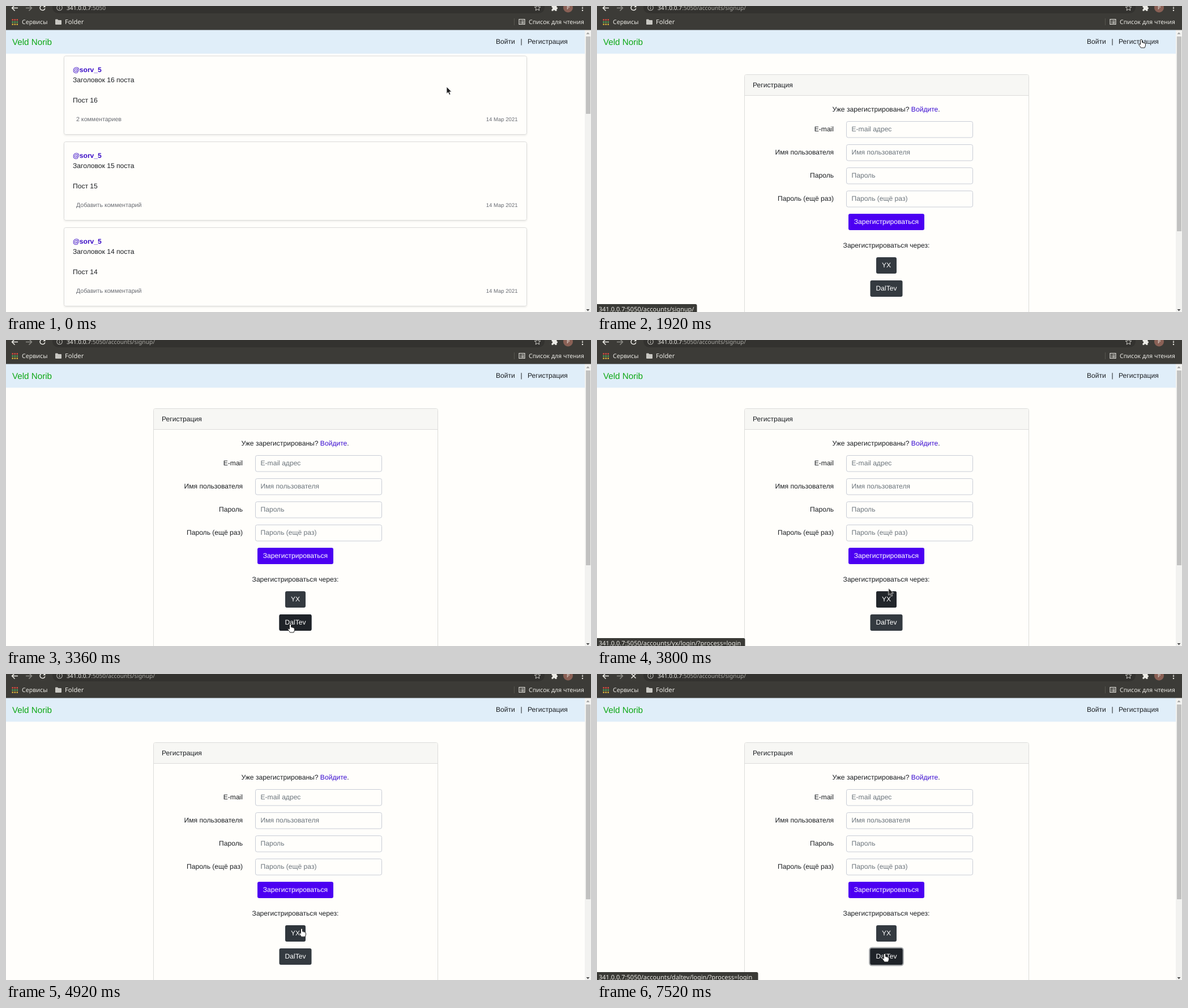
Recreate the animation shown at these times as an HTML page. Size 1033 px wide and 542 px high, loop 8 s.

```html
<!DOCTYPE html>
<html lang="ru">
<head>
<meta charset="utf-8">
<title>Регистрация</title>
<style>
html, body { margin: 0; width: 100%; height: 100%; overflow: hidden; background: #fffefb; }
svg { display: block; width: 1033px; height: 542px; }
text { font: 12.1px "Liberation Sans", Arial, sans-serif; fill: #1c1f23; text-rendering: geometricPrecision; }
.ui { font: 10.6px "Noto Sans", "Open Sans", sans-serif; fill: #ecebe6; }
.brand { font-size: 15.2px; fill: #0ea815; }
.user { font-weight: bold; fill: #3a0cc6; }
.note { font-size: 10.64px; fill: #686b72; }
.date { font-size: 9.55px; fill: #686b72; }
.link { fill: #3a0cd0; }
.hint { fill: #6c757d; }
.light { fill: #fff; }
.mid, .mid text { text-anchor: middle; }
.end, .end text { text-anchor: end; }
.line { fill: none; stroke: #ecebe6; stroke-width: 1.5; }
.card { fill: #fffefb; stroke: #dcdcda; }
.field { fill: #fffefb; stroke: #c8ccd6; }
.status text { font-size: 11px; }
.status path { fill: #3a3a36; }

.cut, .fade, #pointer { animation: 8s infinite; }
.cut { animation-timing-function: step-end; }
.fade, #pointer { animation-timing-function: linear; }

#feed { animation-name: feed; }
#signup { animation-name: signup; }
#path { animation-name: path; }
#under { animation-name: under; }
#reload { animation-name: reload; }
#stop { animation-name: stop; }
@keyframes feed { 0% { opacity: 1 } 24%, 100% { opacity: 0 } }
@keyframes signup { 0% { opacity: 0 } 24%, 100% { opacity: 1 } }
@keyframes path { 0% { opacity: 0 } 22%, 100% { opacity: 1 } }
@keyframes under { 0%, 24%, 100% { opacity: 0 } 8.4% { opacity: 1 } }
@keyframes reload { 0%, 24% { opacity: 1 } 18.5%, 69.5%, 100% { opacity: 0 } }
@keyframes stop { 0%, 24% { opacity: 0 } 18.5%, 69.5%, 100% { opacity: 1 } }

#st-join { animation-name: st-join; }
#st-first { animation-name: st-first; }
#st-second { animation-name: st-second; }
@keyframes st-join { 0%, 14% { opacity: 0 } 14.5% { opacity: .55 } 16%, 29% { opacity: 1 } 31.5%, 100% { opacity: 0 } }
@keyframes st-first { 0%, 46.2% { opacity: 0 } 46.25%, 52% { opacity: 1 } 53% { opacity: .55 } 54%, 100% { opacity: 0 } }
@keyframes st-second {
  0%, 42.8% { opacity: 0 } 44%, 46.2% { opacity: 1 } 46.25%, 66% { opacity: 0 }
  67.5%, 100% { opacity: 1 }
}

#hot-first { animation-name: hot-first; }
#hot-second { animation-name: hot-second; }
#ring { animation-name: ring; }
@keyframes hot-first {
  0%, 39.7% { opacity: 0 } 40.3% { opacity: 1 } 41.5%, 46.1% { opacity: 0 }
  47.2% { opacity: 1 } 49%, 61.3% { opacity: 0 } 62% { opacity: .5 } 63.5%, 100% { opacity: 0 }
}
@keyframes hot-second {
  0%, 41% { opacity: 0 } 42%, 45.8% { opacity: 1 } 47.5%, 62% { opacity: 0 }
  63.5%, 100% { opacity: 1 }
}
@keyframes ring {
  0%, 69.5% { opacity: 0; stroke-width: 0 }
  72.5%, 100% { opacity: 1; stroke-width: 4.6px }
}

#arrow { animation-name: arrow; }
#hand { animation-name: hand; }
#beam { animation-name: beam; }
@keyframes arrow {
  0%, 26%, 38.8%, 40.6%, 45.8%, 47.3%, 60.8%, 62% { opacity: 1 }
  8.4%, 30.3%, 39.7%, 41.2%, 46.1%, 48.6%, 61.3%, 62.3%, 100% { opacity: 0 }
}
@keyframes hand {
  0%, 26%, 38.8%, 40.6%, 45.8%, 47.3%, 49.2%, 60.8%, 62% { opacity: 0 }
  8.4%, 38.2%, 39.7%, 41.2%, 46.1%, 48.6%, 60.3%, 61.3%, 62.3%, 100% { opacity: 1 }
}
@keyframes beam {
  0%, 38.2%, 60.3%, 100% { opacity: 0 }
  30.3%, 49.2% { opacity: 1 }
}
#pointer { animation-name: move; }
@keyframes move {
  0%, 4% { transform: translate(778px, 143px) }
  6% { transform: translate(835px, 112px) }
  8% { transform: translate(920px, 78px) }
  9.5% { transform: translate(980px, 62px) }
  10.5% { transform: translate(991px, 57px) }
  11.5% { transform: translate(985px, 57px) }
  13%, 14.4% { transform: translate(966px, 60px) }
  14.5%, 25.4% { transform: translate(961px, 59px) }
  27% { transform: translate(880px, 95px) }
  29% { transform: translate(700px, 165px) }
  31% { transform: translate(570px, 215px) }
  32%, 34.4% { transform: translate(545px, 226px) }
  36% { transform: translate(540px, 260px) }
  38% { transform: translate(528px, 360px) }
  40% { transform: translate(512px, 465px) }
  42%, 45.4% { transform: translate(502px, 503px) }
  46.2% { transform: translate(506px, 472px) }
  47.3% { transform: translate(512px, 447px) }
  48.7% { transform: translate(530px, 397px) }
  49.3% { transform: translate(540px, 367px) }
  51% { transform: translate(570px, 270px) }
  53%, 56.9% { transform: translate(525px, 226px) }
  59% { transform: translate(528px, 300px) }
  60.5% { transform: translate(526px, 385px) }
  61.5% { transform: translate(522px, 450px) }
  62.5% { transform: translate(518px, 490px) }
  63.5%, 65.9% { transform: translate(517px, 498px) }
  66%, 100% { transform: translate(508px, 495px) }
}
</style>
</head>
<body>
<svg width="1033" height="542" viewBox="0 0 1033 542">
  <defs>
    <filter id="soft" x="-5%" y="-5%" width="110%" height="115%">
      <feDropShadow dx="0" dy="1.5" stdDeviation="1.5" flood-opacity=".08"/>
    </filter>
    <g id="post">
      <rect class="card" x="102.5" y="88.5" width="817" height="139" rx="3" filter="url(#soft)"/>
      <text class="user" x="118" y="117">@sorv_5</text>
      <text class="date end" x="903.5" y="204">14 Мар 2021</text>
    </g>
    <rect id="field" class="field" x="440.5" y="204.5" width="223" height="28.5" rx="3"/>
  </defs>

  <rect width="1033" height="542" fill="#fffefb"/>
  <rect y="42" width="1022" height="42.5" fill="#e0eef9"/>
  <text class="brand" x="11" y="69">Veld Norib</text>
  <text x="865" y="67">Войти</text>
  <text x="908.5" y="67">|</text>
  <text x="921" y="67">Регистрация</text>
  <rect x="1022" y="42" width="11" height="500" fill="#f2f2f0"/>
  <path d="M1024.5 50h6l-3-3.5z" fill="#a3a3a3"/>
  <path d="M1024.5 537h6l-3 3.5z" fill="#505050"/>

  <g id="feed" class="cut">
    <rect x="1024" y="54" width="8" height="137" fill="#c1c1c0"/>
    <use href="#post"/>
    <text x="118" y="135">Заголовок 16 поста</text>
    <text x="118" y="171">Пост 16</text>
    <text class="note" x="124" y="204">2 комментариев</text>
    <g transform="translate(0 152)">
      <use href="#post"/>
      <text x="118" y="135">Заголовок 15 поста</text>
      <text x="118" y="171">Пост 15</text>
      <text class="note" x="124" y="204">Добавить комментарий</text>
    </g>
    <g transform="translate(0 304)">
      <use href="#post"/>
      <text x="118" y="135">Заголовок 14 поста</text>
      <text x="118" y="171">Пост 14</text>
      <text class="note" x="124" y="204">Добавить комментарий</text>
    </g>
    <rect id="under" class="cut" x="921" y="68" width="71" height="1" fill="#16181b"/>
  </g>

  <g id="signup" class="cut">
    <rect x="1024" y="54" width="8" height="345" fill="#c1c1c0"/>
    <rect class="card" x="260.5" y="121.5" width="502" height="440" rx="3"/>
    <path d="M261 158V124.5q0-2.5 2.5-2.5h496q2.5 0 2.5 2.5V158z" fill="#f7f7f4"/>
    <path d="M261 158.5h501" stroke="#dcdcda"/>
    <text x="275" y="144">Регистрация</text>
    <text x="415.5" y="187">Уже зарегистрированы? <tspan class="link">Войдите</tspan>.</text>
    <use href="#field"/>
    <use href="#field" y="41"/>
    <use href="#field" y="82"/>
    <use href="#field" y="123"/>
    <g class="end">
      <text x="418" y="222">E-mail</text>
      <text x="418" y="263">Имя пользователя</text>
      <text x="418" y="304">Пароль</text>
      <text x="418" y="345">Пароль (ещё раз)</text>
    </g>
    <text class="hint" x="449.5" y="222">E-mail адрес</text>
    <text class="hint" x="449.5" y="263">Имя пользователя</text>
    <text class="hint" x="449.5" y="304">Пароль</text>
    <text class="hint" x="449.5" y="345">Пароль (ещё раз)</text>
    <rect x="444" y="368" width="134" height="29" rx="3" fill="#4c00f2"/>
    <rect x="493" y="445" width="36" height="29" rx="3" fill="#343a40"/>
    <rect id="hot-first" class="fade" x="493" y="445" width="36" height="29" rx="3" fill="#1f2328"/>
    <rect id="ring" class="fade" x="482.5" y="486" width="57" height="29" rx="3" fill="none" stroke="#a3a6a8"/>
    <rect x="482.5" y="486" width="57" height="29" rx="3" fill="#343a40"/>
    <rect id="hot-second" class="fade" x="482.5" y="486" width="57" height="29" rx="3" fill="#1f2328"/>
    <g class="mid">
      <text class="light" x="511" y="386">Зарегистрироваться</text>
      <text x="511" y="428">Зарегистрироваться через:</text>
      <text class="light" x="511" y="463">YX</text>
      <text class="light" x="511" y="504">DalTev</text>
    </g>
  </g>

  <!-- browser bars -->
  <rect width="1033" height="42.5" fill="#3c3b37"/>
  <rect x="82" y="-8" width="869" height="21" rx="10.5" fill="#33322f"/>
  <path class="line" d="M21 3.5H11M15.5-1.5l-5 5 5 5"/>
  <path class="line" d="M35 3.5h10M40.5-1.5l5 5-5 5" style="stroke:#8b8a85"/>
  <g id="reload" class="cut">
    <path class="line" d="M68.8 4.2a4.4 4.4 0 1 1-1.3-4.3"/>
    <path d="M69.5-2v4.3h-4.3z" fill="#ecebe6"/>
  </g>
  <path id="stop" class="line cut" d="M60.5-.5l8 8m0-8l-8 8"/>
  <circle class="line" cx="94.5" cy="3" r="4.8" style="stroke:#b8b7b2;stroke-width:1.1"/>
  <path d="M94.5 2.5v3.2M94.5.3v1.2" stroke="#b8b7b2" stroke-width="1.2"/>
  <text class="ui" x="107" y="7" style="font-size:10.2px">341.0.0.7<tspan fill="#aaa9a4">:5050</tspan></text>
  <text id="path" class="ui cut" x="176.2" y="7" style="font-size:10.2px;fill:#aaa9a4">/accounts/signup/</text>
  <path class="line" d="M938.5-2l1.5 3.5 3.7.3-2.8 2.5.9 3.6-3.300-2-3.300 2 .9-3.600-2.800-2.500 3.700-.3z" style="stroke:#cfcec9;stroke-width:1"/>
  <path d="M963.5-1h3a1.6 1.6 0 0 1 3.2 0h2.8v3.2a1.6 1.6 0 0 1 0 3.2v3.3h-3a1.6 1.6 0 0 0-3.2 0h-2.8v-3a1.7 1.7 0 0 0 0-3.4z" fill="#ecebe6"/>
  <circle cx="992.5" cy="3" r="8.5" fill="#8a6055"/>
  <text class="ui mid" x="992.5" y="6" style="font-size:8.5px">P</text>
  <path d="M1018-.7v.01M1018 3.5v.01M1018 7.7v.01" stroke="#ecebe6" stroke-width="2.4" stroke-linecap="round"/>

  <g stroke-width="2.5" stroke-dasharray="2.5 1.5">
    <path d="M10.5 24.5h10.5" stroke="#e04a3f"/>
    <path d="M10.5 28.5h10.5" stroke="#55a85a"/>
    <path d="M10.5 32.5h10.5" stroke="#d9b23c"/>
  </g>
  <text class="ui" x="28" y="32">Сервисы</text>
  <path d="M87 24.5q0-1 1-1h3l1.5 1.5h4.5q1 0 1 1v6q0 1-1 1h-9q-1 0-1-1z" fill="#c9c8c3"/>
  <text class="ui" x="104" y="32" style="font-size:11.2px">Folder</text>
  <path d="M897.5 22v12" stroke="#55544f"/>
  <path class="line" d="M906 23.5h10v9h-10zM908 26h1m1 0h4.5M908 28.2h1m1 0h4.5M908 30.4h1m1 0h4.5" style="stroke-width:1.1"/>
  <text class="ui" x="923" y="32">Список для чтения</text>

  <!-- link preview -->
  <g id="st-join" class="status fade">
    <path d="M0 528h173.5q3 0 3 3v11H0z"/>
    <text class="ui" x="3" y="540.5">341.0.0.7:5050/accounts/signup/</text>
  </g>
  <g id="st-first" class="status fade">
    <path d="M0 528h258.5q3 0 3 3v11H0z"/>
    <text class="ui" x="3" y="540.5">341.0.0.7:5050/accounts/yx/login/?process=login</text>
  </g>
  <g id="st-second" class="status fade">
    <path d="M0 528h281.5q3 0 3 3v11H0z"/>
    <text class="ui" x="3" y="540.5">341.0.0.7:5050/accounts/daltev/login/?process=login</text>
  </g>

  <g id="pointer">
    <path id="arrow" class="cut" d="M0 0v12.5l2.8-2.7 2 4.7 2.2-1-2-4.5h3.8z" fill="#1e1e1e" stroke="#fff" stroke-width=".8"/>
    <path id="hand" class="cut" d="M-1.5 1Q0-.6 1.5 1v4.5l3.5.8q2.5.5 2.5 2.7v2q-.5 2-1.5 4h-6.5q-1.5-2.5-3.5-5-1-2 1-2l1.500 1.200z" fill="#fff" stroke="#222"/>
    <path id="beam" class="cut" d="M-2.5-6q2.5 0 2.5 1.5v9q0 1.5-2.5 1.5M2.5-6Q0-6 0-4.5M0 4.5Q0 6 2.5 6" fill="none" stroke="#222" stroke-width="1.2"/>
  </g>
</svg>
</body>
</html>
```
